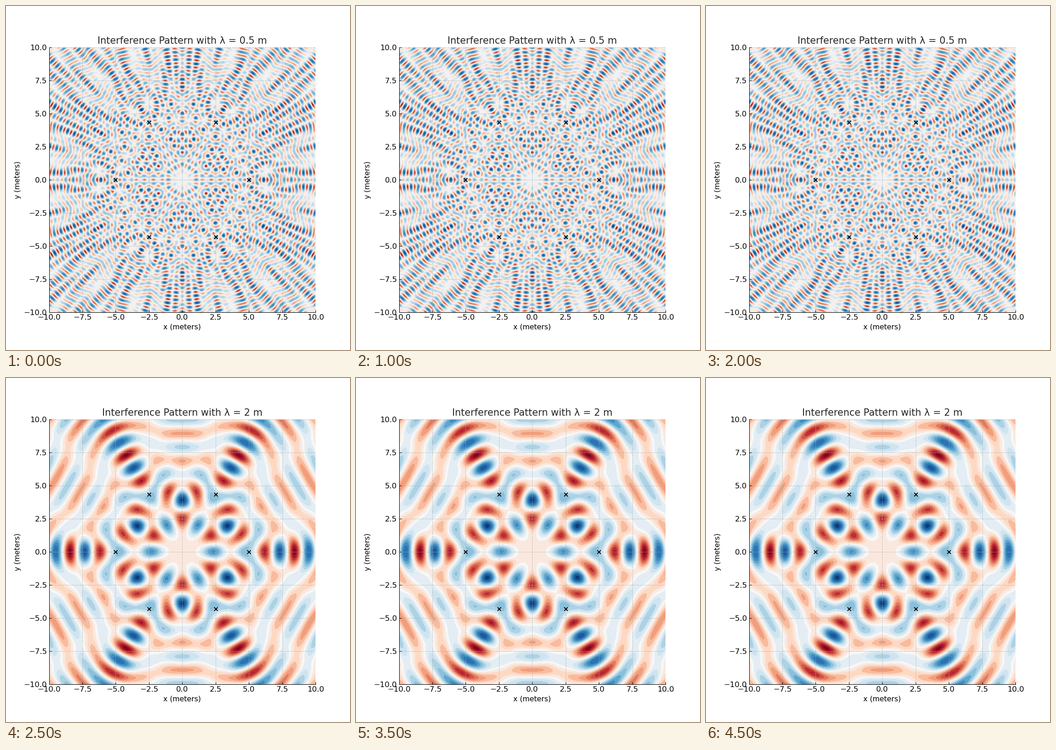
These frames come from a looping animation (748 by 748 pixels, 5000 ms). A matplotlib script:

```python
import numpy as np
import matplotlib.pyplot as plt
from matplotlib.animation import FuncAnimation

plt.rcParams.update({
    "font.family": "DejaVu Sans",
    "axes.spines.top": False,
    "axes.spines.right": False,
    "xtick.direction": "in",
    "ytick.direction": "in",
})

HALF = 10
RADIUS = 5
WAVELENGTHS = (0.5, 2)
FRAMES = 10
INTERVAL = 500

angles = np.arange(6) * np.pi / 3
src_x, src_y = RADIUS * np.cos(angles), RADIUS * np.sin(angles)

axis = np.linspace(-HALF, HALF, 400)
X, Y = np.meshgrid(axis, axis)


def field(wavelength):
    """Sum of unit waves sent out by all sources."""
    k = 2 * np.pi / wavelength
    return sum(np.sin(k * np.hypot(X - sx, Y - sy))
               for sx, sy in zip(src_x, src_y))


fig, ax = plt.subplots(figsize=(8, 8), dpi=93.5, facecolor="white")

patterns = [ax.contourf(X, Y, field(w), levels=20, cmap="RdBu")
            for w in WAVELENGTHS]
ax.scatter(src_x, src_y, color="black", marker="x", zorder=3)

ticks = np.arange(-HALF, HALF + 1, 2.5)
ax.set(xlim=(-HALF, HALF), ylim=(-HALF, HALF), xticks=ticks, yticks=ticks)
ax.tick_params(labelsize=12.7)
ax.set_xlabel("x (meters)", fontsize=12)
ax.set_ylabel("y (meters)", fontsize=12)
ax.grid(True, color="#b0b0b0", linestyle="--", linewidth=0.8, alpha=0.7)
title = ax.set_title("", fontsize=16, color="#262626")


def draw(frame):
    current = frame % len(WAVELENGTHS)
    for i, pattern in enumerate(patterns):
        pattern.set_visible(i == current)
    title.set_text(f"Interference Pattern with λ = {WAVELENGTHS[current]} m")
    return [*patterns, title]


anim = FuncAnimation(fig, draw, frames=FRAMES, interval=INTERVAL,
                     init_func=lambda: draw(0), repeat=True, repeat_delay=0)
plt.show()
```
